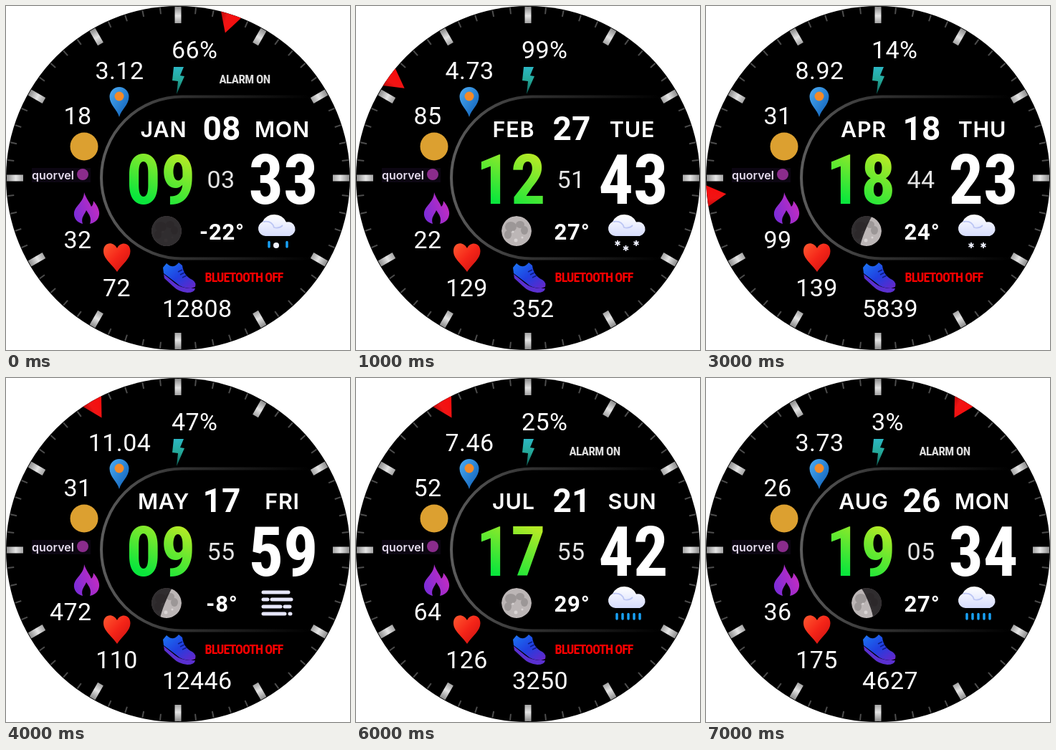
These frames come from a looping animation (480 by 480 pixels, 8 s). An HTML page:

```html
<!DOCTYPE html>
<html lang="en">
<head>
<meta charset="utf-8">
<title>Watch face</title>
<style>
html, body { margin: 0; width: 100%; height: 100%; overflow: hidden; background: #fff; }
svg { display: block; width: 100vw; height: 100vh; }
text { fill: #fff; font-family: Roboto, sans-serif; }
.num { font-size: 34px; letter-spacing: .4px; }
.word { font: 600 30.5px Inter, sans-serif; letter-spacing: .8px; }
.big, .note { font-family: "Roboto Condensed", "Open Sans Condensed", "Liberation Sans Narrow", Roboto, sans-serif; font-weight: 700; }
.big { font-size: 96px; }
.mid { text-anchor: middle; }
.end { text-anchor: end; }
</style>
</head>
<body>
<svg viewBox="0 0 480 480">
  <defs>
    <clipPath id="dial"><circle cx="240" cy="240" r="240"/></clipPath>
    <clipPath id="disc"><circle r="21"/></clipPath>
    <linearGradient id="steel" x1="0" y1="1" x2="0" y2="24" gradientUnits="userSpaceOnUse">
      <stop stop-color="#8c8c8c"/><stop offset=".55" stop-color="#e4e4e4"/><stop offset="1" stop-color="#a4a4a4"/>
    </linearGradient>
    <linearGradient id="red"><stop stop-color="#b80808"/><stop offset=".35" stop-color="#f01414"/><stop offset="1" stop-color="#f80c0c"/></linearGradient>
    <linearGradient id="rim" x1="132" x2="425" y1="0" y2="0" gradientUnits="userSpaceOnUse">
      <stop stop-color="#5c5c5c"/><stop offset=".4" stop-color="#303030"/><stop offset="1" stop-color="#000"/>
    </linearGradient>
    <linearGradient id="lime" x1="240" y1="206" x2="205" y2="278" gradientUnits="userSpaceOnUse">
      <stop stop-color="#b2ea26"/><stop offset="1" stop-color="#0ae63c"/>
    </linearGradient>
    <linearGradient id="bolt" x1="0" y1="0" x2="0" y2="1"><stop stop-color="#2cb8c4"/><stop offset=".5" stop-color="#24a898"/><stop offset="1" stop-color="#0c6058"/></linearGradient>
    <linearGradient id="pin" x2="1" y2="1"><stop stop-color="#4cacf4"/><stop offset="1" stop-color="#0c5cb4"/></linearGradient>
    <linearGradient id="flame" x1="0" y1=".8" x2="1" y2=".3"><stop stop-color="#782cd8"/><stop offset="1" stop-color="#c82cc0"/></linearGradient>
    <linearGradient id="heart" x2="1" y2="1"><stop stop-color="#ff5a30"/><stop offset=".5" stop-color="#f42418"/><stop offset="1" stop-color="#c81010"/></linearGradient>
    <linearGradient id="shoe" x2="1" y2="1"><stop stop-color="#1c78f4"/><stop offset=".5" stop-color="#2040e0"/><stop offset="1" stop-color="#6a24c8"/></linearGradient>
    <linearGradient id="cloud" x2="0" y2="1"><stop stop-color="#fff"/><stop offset="1" stop-color="#d6dcfc"/></linearGradient>
    <linearGradient id="night" x2="0" y2="1"><stop stop-color="#1c8cf0"/><stop offset="1" stop-color="#10b4f4"/></linearGradient>
  </defs>

  <g clip-path="url(#dial)">
    <rect width="480" height="480"/>
    <g id="ticks"></g>
    <path id="hand" d="M225 0H255L240 27Z" fill="url(#red)"/>
  </g>
  <path d="M425 126.500H246A113 113 0 0 0 246 352.500H425" fill="none" stroke="url(#rim)" stroke-width="4"/>

  <path d="M234 85H248L243 97L249 98L238 123L240 105L232 104Z" fill="url(#bolt)"/>
  <path d="M158 155C155 144 144.500 138 144.500 126.500A13.500 13.500 0 0 1 171.500 126.500C171.500 138 161 144 158 155Z" fill="url(#pin)"/>
  <circle cx="158" cy="126" r="6.500" fill="#f48a28"/>
  <circle cx="109" cy="196" r="19.500" fill="#dca030"/>
  <rect x="36" y="226" width="82" height="20" fill="#0c0612"/>
  <text x="36" y="242" style="font:600 16px Inter,sans-serif;fill:#e6dcee">quorvel</text>
  <circle cx="107" cy="235" r="8" fill="#8a2c8c"/>
  <path d="M109 260C112 269 117 274 119 280Q122 277 122 272C129 280 132 288 129 295C127 300 122 303 117 304C120 296 116 291 112 285C110 291 104 295 107 304C99 302 94 296 95 288C97 278 109 273 109 260Z" fill="url(#flame)"/>
  <path d="M155 371C147 359 136 353 136 342C136 329 150 328 155 338C160 328 173.500 330 173.500 342C173.500 353 163 359 155 371Z" fill="url(#heart)"/>
  <path d="M219 365L224 359Q233 368 241 358L246 362C247 372 253 379 260 382Q266 386 264 392L258 394Q245 394 237 386L220 373Z" fill="url(#shoe)"/>
  <path d="M220 374L236 387Q245 395 264 394Q263 400 253 400Q241 399 233 391L221 380Z" fill="#5a30d0"/>
  <path d="M240 371l6-3M243 375l6-3M246 379l6-3" stroke="#0c1c80" stroke-width="1.500"/>

  <g transform="translate(224 314)">
    <g clip-path="url(#disc)">
      <circle r="21" fill="#bcb6b6"/>
      <g fill="#888282" opacity=".6">
        <ellipse cx="-8" cy="-6" rx="8" ry="7"/><ellipse cx="5" cy="-9" rx="6" ry="5"/>
        <ellipse cx="11" cy="-1" rx="5" ry="6"/><ellipse cx="-12" cy="5" rx="5" ry="6"/>
      </g>
      <g fill="#e0dcdc" opacity=".8"><circle cx="-1" cy="13" r="2.500"/><circle cx="-5" cy="1" r="1.500"/><circle cx="8" cy="9" r="1.500"/></g>
      <path id="shade" fill="#1a1719" opacity=".86"/>
    </g>
  </g>
  <g id="sky"></g>
  <g id="labels"></g>
</svg>

<script>
const NS = "http://www.w3.org/2000/svg";
const $ = id => document.getElementById(id);

// key, x, baseline, class, extra style
const fields = [
  ["power", 231, 73, "num"],
  ["dist", 158.5, 101.5, "num mid"],
  ["score", 100, 165, "num mid"],
  ["burn", 119.5, 337.5, "num end"],
  ["pulse", 154.5, 405, "num mid"],
  ["steps", 218, 433.5, "num"],
  ["month", 220, 183, "word mid"],
  ["date", 301, 187, "mid", "font-size:46px;font-weight:700"],
  ["day", 385.5, 183, "word mid"],
  ["hour", 216, 276, "big mid", "fill:url(#lime)"],
  ["min", 387, 276, "big mid"],
  ["sec", 300, 254, "num mid", "fill:#e4e4e4"],
  ["temp", 301.5, 326, "mid", "font-size:31px;font-weight:600;letter-spacing:.8px"],
  ["alarm", 333, 108, "note mid", "font-size:17px;fill:#dcdcdc"],
  ["link", 332, 385, "note mid", "font-size:18px;fill:#f00"]
];

const A = "ALARM ON", B = "BLUETOOTH OFF";
// field values in order, then moon and weather
const states = [
  ["66%", "3.12", "18", "32", "72", "12808", "JAN", "08", "MON", "09", "33", "03", "-22°", A, B, "new", "sleet"],
  ["99%", "4.73", "85", "22", "129", "352", "FEB", "27", "TUE", "12", "43", "51", "27°", "", B, "full", "snow"],
  ["82%", "6.35", "64", "57", "104", "7215", "MAR", "14", "WED", "15", "48", "38", "16°", "", B, "waning", "snow"],
  ["14%", "8.92", "31", "99", "139", "5839", "APR", "18", "THU", "18", "23", "44", "24°", "", B, "waxing", "flurry"],
  ["47%", "11.04", "31", "472", "110", "12446", "MAY", "17", "FRI", "09", "59", "55", "-8°", "", B, "waxing", "fog"],
  ["40%", "11.22", "47", "178", "89", "1878", "JUN", "22", "SAT", "16", "23", "18", "35°", A, B, "full", "night"],
  ["25%", "7.46", "52", "64", "126", "3250", "JUL", "21", "SUN", "17", "42", "55", "29°", A, B, "full", "rain"],
  ["3%", "3.73", "26", "36", "175", "4627", "AUG", "26", "MON", "19", "34", "05", "27°", A, "", "waning", "rain"]
];

const half = (side, k, turn) =>
  [`M0-22A22 22 0 0 ${side} 0 22A${k} 22 0 0 ${1 - side} 0-22Z`, turn];
const moons = {
  full: ["", 0],
  new: ["M-22-22H22V22H-22Z", 0],
  waxing: half(0, 2, 22),
  waning: half(1, 3, -22)
};

const line = (x1, y, x2) => `M${x1} ${y}H${x2}`;
const bars = xs => `<path d="${xs.map(x => `M${x} 329.500v6.500`).join("")}" stroke="#18a0f4" stroke-width="3.500" stroke-linecap="round"/>`;
const flake = (x, y) => {
  const arms = [0, 60, 120].map(a => `<path d="M0-4V4" transform="rotate(${a})"/>`).join("");
  return `<g transform="translate(${x} ${y})" stroke="#f0f2ff" stroke-width="1.800">${arms}</g>`;
};
const cloud = `<path d="M362 321A10.500 10.500 0 0 1 358 301A18.500 18.500 0 0 1 391 301.500A10 10 0 0 1 396 321Z" fill="url(#cloud)"/>
  <path d="M359 301Q371 299 374 309Q381 311 386 306" fill="none" stroke="#bcc6f4" stroke-width="1.800"/>`;
const skies = {
  sleet: cloud + bars([367, 392]) + '<circle cx="377" cy="334" r="4" fill="#eef2ff"/>',
  snow: cloud + flake(365, 331) + flake(376.5, 338) + flake(391, 331),
  flurry: cloud + flake(370, 334) + flake(387, 334),
  rain: cloud + bars([364, 372, 380, 388, 396]),
  fog: `<path d="${line(359, 299, 394) + line(359, 309, 365) + line(371, 309, 398) +
    line(359, 319, 383) + line(389, 319, 396) + line(359, 329, 389) + line(396, 329, 397)}"
    stroke="#e6e6fa" stroke-width="5" stroke-linecap="round"/>`,
  night: '<path d="M375 292A22 22 0 1 1 358 322A18.500 18.500 0 0 0 375 292Z" fill="url(#night)"/>'
};

const ticks = Array.from({ length: 60 }, (_, i) => {
  const r = document.createElementNS(NS, "rect"), major = i % 5 === 0;
  const [x, y, w, h] = major ? [235.5, 1, 9, 23] : [239, 1, 2, 9];
  Object.entries({ x, y, width: w, height: h, fill: major ? "url(#steel)" : "#4c4c4c", transform: `rotate(${i * 6} 240 240)` })
    .forEach(([k, v]) => r.setAttribute(k, v));
  return $("ticks").appendChild(r);
});

const labels = fields.map(([key, x, y, cls, style]) => {
  const t = document.createElementNS(NS, "text");
  t.setAttribute("x", x);
  t.setAttribute("y", y);
  t.setAttribute("class", cls);
  t.setAttribute("style", style || "");
  return $("labels").appendChild(t);
});

// tighter tracking where no condensed face is installed
function tighten(key, text, max) {
  const el = labels[fields.findIndex(f => f[0] === key)];
  el.textContent = text;
  el.style.letterSpacing = Math.min(0, (max - el.getComputedTextLength()) / text.length) + "px";
}
tighten("hour", "00", 98);
tighten("min", "00", 98);
tighten("alarm", A, 71);
tighten("link", B, 109);

let shown = -1;
function show(n) {
  if (n === shown) return;
  shown = n;
  const s = states[n], sec = +s[11];
  labels.forEach((t, i) => { t.textContent = s[i]; });
  $("hand").setAttribute("transform", `rotate(${sec * 6} 240 240)`);
  ticks.forEach((t, i) => { t.style.display = i === sec ? "none" : ""; });
  const [d, turn] = moons[s[15]];
  $("shade").setAttribute("d", d);
  $("shade").setAttribute("transform", `rotate(${turn})`);
  $("sky").innerHTML = skies[s[16]];
}

const start = performance.now();
function run() {
  show(Math.floor((performance.now() - start) / 1000) % states.length);
  requestAnimationFrame(run);
}
run();
</script>
</body>
</html>
```
